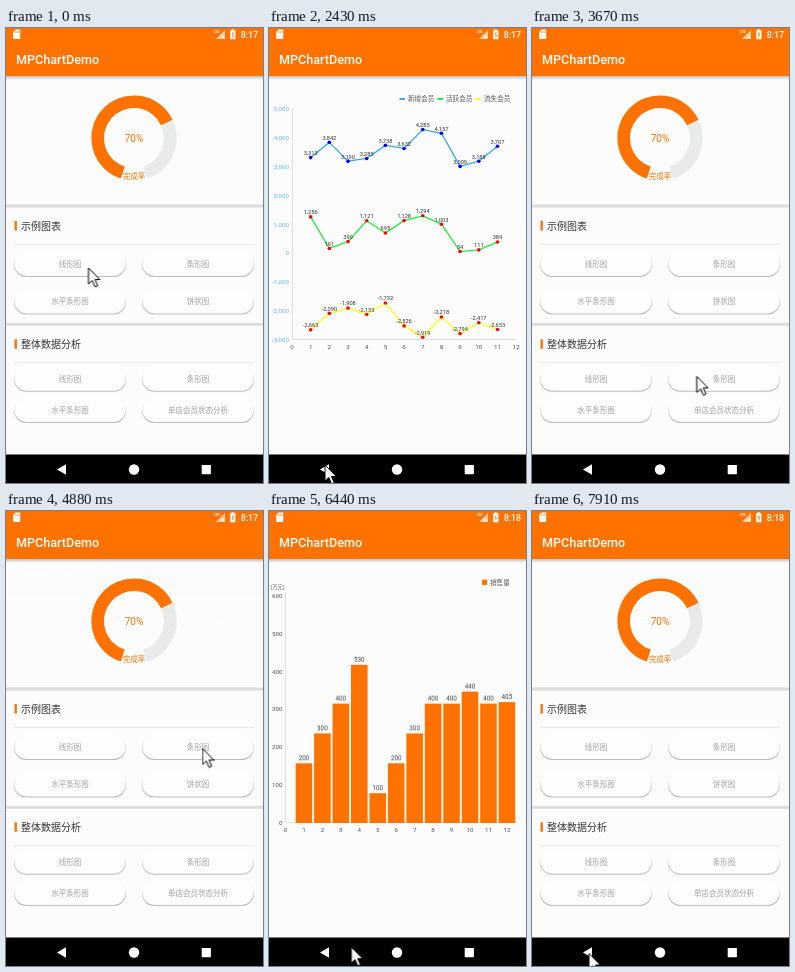
Recreate the animation shown at these times as an HTML page. Size 257 by 455 pixels, loop 8 s.

```html
<!DOCTYPE html>
<html lang="zh-CN">
<head>
<meta charset="utf-8">
<title>MPChartDemo</title>
<style>
html, body { margin: 0; width: 100%; height: 100%; overflow: hidden; background: #fcfcfc; }
svg { display: block; width: 257px; height: 455px; }
text { font-family: Roboto, 'Noto Sans CJK SC', 'Noto Sans CJK', sans-serif; }

/* One loop is 8 s, so 1% = 80 ms */
#line, #bars, #cursor, .clock, .bar { animation: 8s linear infinite; }
#line { animation-name: line-page; }
#bars { animation-name: bar-page; }
#cursor { animation-name: cursor; }
.clock { animation-name: clock; animation-timing-function: step-end; }
.clock.late { animation-name: late-clock; }
.bar { animation-name: grow; }
.pt { visibility: hidden; animation: pop 8s step-end var(--t) infinite; }

@keyframes line-page {
  0%, 8% { opacity: 0; transform: translateY(36px); }
  10.5% { opacity: 1; transform: translateY(8px); }
  12%, 37.5% { opacity: 1; transform: none; }
  40.6%, 100% { opacity: 0; transform: translateY(36px); }
}
@keyframes bar-page {
  0%, 61% { opacity: 0; transform: translateY(36px); }
  63.5% { opacity: 1; transform: translateY(8px); }
  65%, 93.9% { opacity: 1; transform: none; }
  97%, 100% { opacity: 0; transform: translateY(36px); }
}
@keyframes grow {
  0%, 63.75% { transform: translateY(var(--h)); }
  73.75% { transform: translateY(calc(var(--h) * .428)); }
  87.2%, 100% { transform: none; }
}
@keyframes pop {
  0% { visibility: visible; }
  50%, 100% { visibility: hidden; }
}
@keyframes clock { 0% { opacity: 1; } 73.75%, 100% { opacity: 0; } }
@keyframes late-clock { 0% { opacity: 0; } 73.75%, 100% { opacity: 1; } }
@keyframes cursor {
  0%, 1.62% { transform: translate(82.5px, 240px); }
  1.625%, 7.5% { transform: translate(78.5px, 239.5px); }
  13.5%, 15.2% { transform: translate(114.5px, 320px); }
  20% { transform: translate(82px, 404px); }
  25.1%, 39% { transform: translate(56px, 437px); }
  45.87% { transform: translate(164.5px, 349px); }
  47.75% { transform: translate(189.5px, 285px); }
  54.1%, 62% { transform: translate(196.5px, 237.5px); }
  71.8%, 74% { transform: translate(114px, 428px); }
  85.7%, 100% { transform: translate(57px, 442.5px); }
}
</style>
</head>
<body>
<svg id="stage" viewBox="0 0 257 455"></svg>
<script>
const ORANGE = '#ff7200', INK = '#555', AXIS = '#d6d6d6';

// Text centred vertically on cy
const text = (s, x, cy, size, fill, anchor = 'middle', extra = '') =>
  `<text x="${x}" y="${cy + size * .365}" font-size="${size}" fill="${fill}" text-anchor="${anchor}" ${extra}>${s}</text>`;
const rect = (x, y, w, h, fill, extra = '') =>
  `<rect x="${x}" y="${y}" width="${w}" height="${h}" fill="${fill}" ${extra}/>`;
const path = (d, stroke, width, extra = '') =>
  `<path d="${d}" fill="none" stroke="${stroke}" stroke-width="${width}" ${extra}/>`;
const each = (n, fn) => Array.from({ length: n }, (_, i) => fn(i)).join('');

const frame = () =>
  rect(0, 0, 257, 455, '#fcfcfc') + rect(0, 48, 257, 4, 'url(#shade)') + rect(0, 0, 257, 48, ORANGE) +
  text('MPChartDemo', 10, 31.8, 12.6, '#fff', 'start', 'font-weight="500"');

// Home page
function arc(from, to, color) {
  const at = a => `${128 + 36.3 * Math.cos(a * Math.PI / 180)} ${110 + 36.3 * Math.sin(a * Math.PI / 180)}`;
  return path(`M${at(from)}A36.3 36.3 0 ${to - from > 180 ? 1 : 0} 1 ${at(to)}`, color, 12.6);
}
const button = (label, x, y) =>
  rect(x, y + .9, 112, 24.4, '#bdbdbd', 'rx="12.2" filter="url(#soft)"') +
  rect(x + .3, y, 111.4, 24.2, '#fdfdfd', 'rx="12.1"') +
  text(label, x + 56, y + 12.3, 7.5, '#a2a2a2');
const section = (title, y, line, rows, labels) =>
  rect(0, y - 21.5, 257, 3, '#dcdcdc') + rect(8.5, y - 5, 2.4, 9.5, ORANGE) +
  text(title, 15, y, 10, '#333', 'start', 'font-weight="500"') +
  rect(8, line, 240, .8, '#e4e4e4') +
  labels.map((s, i) => button(s, i % 2 ? 136 : 8, rows[i >> 1])).join('');

const home = frame() +
  arc(334.8, 432, '#e9ebea') + arc(108, 334.8, ORANGE) +
  text('70%', 128, 110.3, 10, ORANGE) + text('完成率', 128, 148, 7.5, ORANGE) +
  section('示例图表', 198, 216, [223.7, 261.2], ['线形图', '条形图', '水平条形图', '饼状图']) +
  section('整体数据分析', 316.3, 334.4, [338.5, 369.7], ['线形图', '条形图', '水平条形图', '单店会员状态分析']);

// Line chart
const series = [
  { name: '新增会员', color: '#35a9e6', dot: '#00f', v: [3313, 3842, 3190, 3285, 3738, 3632, 4285, 4157, 3009, 3188, 3707] },
  { name: '活跃会员', color: '#1cf03c', dot: '#f00', v: [1256, 161, 399, 1121, 695, 1128, 1294, 1003, 54, 111, 384] },
  { name: '流失会员', color: '#ffff14', dot: '#f00', v: [-2663, -2090, -1908, -2133, -1732, -2526, -2919, -2218, -2794, -2417, -2653] },
];
const shown = [940, 1080, 1230, 1350, 1470, 1590, 1730, 1870, 2010, 2310, 2430];
const lx = i => 23 + 18.68 * i;
const ly = v => 225.1 - v * .02882;
const comma = v => v.toLocaleString('en-US');
const layer = draw => series.map(s => s.v.map((v, i) =>
  `<g class="pt" style="--t:${shown[i]}ms">${draw(s, v, i)}</g>`).join('')).join('');

const lineChart = frame() +
  series.map((s, i) => rect(130.5 + 38 * i, 70, 5.4, 2, s.color) +
    text(s.name, 139 + 38 * i, 71, 6.6, INK, 'start')).join('') +
  each(9, i => text(comma(5000 - 1000 * i), 20, ly(5000 - 1000 * i), 6.25, '#62bbea', 'end')) +
  each(13, i => text(i, lx(i), 318.6, 6.25, INK)) +
  path('M23.5 81V311.5H247.5', AXIS, .8) +
  layer((s, v, i) => i ? path(`M${lx(i)} ${ly(s.v[i - 1])}L${lx(i + 1)} ${ly(v)}`, s.color, 1.3) : '') +
  layer((s, v, i) => `<circle cx="${lx(i + 1)}" cy="${ly(v)}" r="1.8" fill="${s.dot}"/>`) +
  layer((s, v, i) => text(comma(v), lx(i + 1), ly(v) - 4.7, 5.7, '#333'));

// Bar chart
const sales = [200, 300, 400, 530, 100, 200, 300, 400, 400, 440, 400, 405];
const bx = i => 16.5 + 18.45 * i;
const UNIT = .3793;

const barChart = frame() +
  rect(213, 68.7, 5.2, 5.2, ORANGE) + text('销售量', 221, 71.2, 6.6, INK, 'start') +
  text('(万元)', 8.5, 76, 5.2, INK) +
  each(7, i => text(100 * i, 13.5, 312 - 100 * i * UNIT, 6.25, INK, 'end')) +
  each(13, i => text(i, bx(i), 318.4, 6.25, INK)) +
  path('M16.5 82V311.7H247.5', AXIS, .8) +
  `<g clip-path="url(#plot)">` + sales.map((v, i) => {
    const h = v * UNIT, x = bx(i + 1);
    return `<g class="bar" style="--h:${h}px">` + rect(x - 8.3, 312 - h, 16.6, h, ORANGE) +
      text(v, x, 307.2 - h, 6.3, '#444') + '</g>';
  }).join('') + '</g>';

// System bars
const clock = (s, cls) => text(s, 252, 6.4, 8.8, '#fff', 'end', `class="clock ${cls}" font-weight="500"`);
const system =
  `<path d="M9.6 1.5H14.2V11H7.2V4Z" fill="#fff"/>` + path('M9.6 3v2M11.1 3v2M12.6 3v2', ORANGE, .6) +
  `<path d="M219 2V11H210Z" fill="#fff" opacity=".65"/>` + path('M215.5 7.5l3 3m0-3l-3 3', '#fff', .9) +
  text('LTE', 210.6, 3.6, 3.6, '#fff', 'middle', 'font-weight="700"') +
  `<path d="M225.6 1.2h2.4v1.1h1.4V11.2h-5.2V2.3h1.4Z" fill="#fff"/>` + path('M227.3 4l-1.2 2.8h1.5l-1.2 2.6', ORANGE, .8) +
  clock('8:17', '') + clock('8:18', 'late') +
  rect(0, 426.5, 257, 29, '#000') +
  `<path d="M51 441.5L60 436.3V446.7Z" fill="#fff"/><circle cx="128" cy="441.5" r="5.2" fill="#fff"/>` +
  rect(195.7, 437, 9.2, 9.2, '#fff', 'rx=".6"');

document.getElementById('stage').innerHTML = `
<defs>
  <linearGradient id="shade" x2="0" y2="1"><stop stop-color="#999" stop-opacity=".6"/><stop offset="1" stop-color="#999" stop-opacity="0"/></linearGradient>
  <filter id="soft" x="-5%" y="-20%" width="110%" height="140%"><feGaussianBlur stdDeviation=".6"/></filter>
  <clipPath id="plot"><rect y="50" width="257" height="262"/></clipPath>
</defs>
<g>${home}</g>
<g id="line">${lineChart}</g>
<g id="bars">${barChart}</g>
${system}
<path id="cursor" d="M0 0V16L3.8 12.5L6.6 18.8L9.2 17.7L6.5 11.6H11.4Z" fill="#fff" stroke="#000" stroke-width="1" stroke-linejoin="round"/>`;
</script>
</body>
</html>
```
